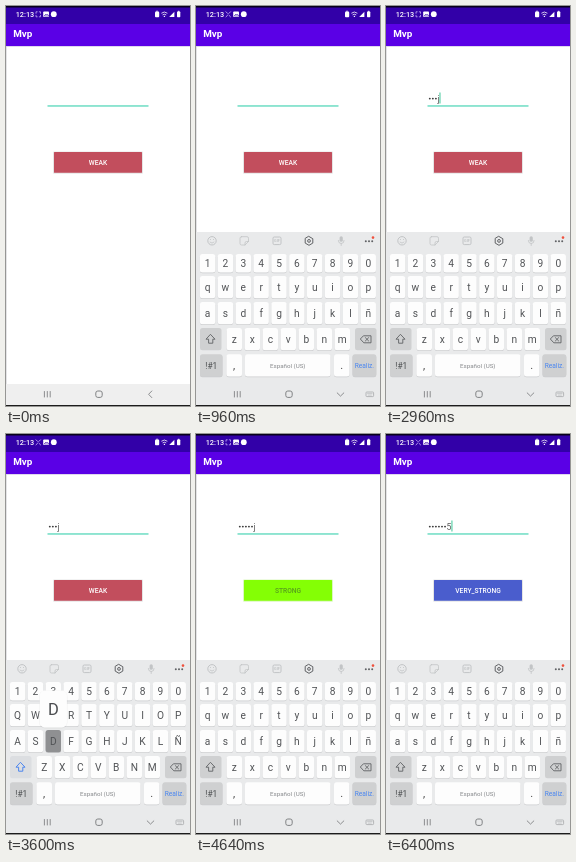
An HTML page that plays this animation: 184x400 px, repeating every 6560 ms.

```html
<!DOCTYPE html>
<html lang="es">
<head>
<meta charset="utf-8">
<style>
html, body { margin: 0; width: 100%; height: 100%; overflow: hidden; background: #fff; }
svg { display: block; width: 184px; height: 400px; font-family: Roboto, sans-serif; }
text { text-anchor: middle; }
.line { fill: none; stroke-linecap: round; stroke-linejoin: round; }
</style>
</head>
<body>
<svg id="stage" viewBox="0 0 184 400"></svg>
<script>
const LOOP = 6560, STEP = 80;
const NS = 'http://www.w3.org/2000/svg';
const stage = document.getElementById('stage');

function add(parent, tag, attrs, label) {
  const el = document.createElementNS(NS, tag);
  for (const k in attrs) el.setAttribute(k, attrs[k]);
  if (label !== undefined) el.textContent = label;
  parent.appendChild(el);
  return el;
}
const group = (p, a = {}) => add(p, 'g', a);
const rect = (p, x, y, width, height, fill, rx = 0) => add(p, 'rect', { x, y, width, height, fill, rx });
const dot = (p, cx, cy, r, fill) => add(p, 'circle', { cx, cy, r, fill });
const line = (p, d, stroke, w = 0.8) => add(p, 'path', { d, stroke, 'stroke-width': w, class: 'line' });
const text = (p, x, y, size, fill, s, extra) => add(p, 'text', { x, y, 'font-size': size, fill, ...extra }, s);
const show = (el, on) => el.setAttribute('display', on ? 'inline' : 'none');

// Page
rect(stage, 0, 0, 184, 400, '#fff');
rect(stage, 0, 40, 0.7, 338, '#d9d9dc');
rect(stage, 0, 0, 184, 18, '#3200a8');
rect(stage, 0, 0, 184, 1.5, '#08001c');
rect(stage, 0, 18, 184, 22, '#5a00e6');
rect(stage, 0, 40, 184, 0.8, '#d8cdea');
text(stage, 7.2, 31.1, 9.9, '#fff', 'Mvp', { 'font-weight': 700, style: 'text-anchor:start' });

// Status bar
text(stage, 9.7, 10.9, 7.3, '#fff', '12:13', { 'font-weight': 500, style: 'text-anchor:start' });
const corners = line(stage, 'M30 7.300v-1.500h1.200M33.300 5.800h1.200v1.500M34.500 9.300v1.500h-1.200M31.200 10.800h-1.200v-1.500', '#d6c8ff', 0.7);
const cross = line(stage, 'M30 5.800l1.600 1.600M34.500 5.800l-1.600 1.600M30 10.800l1.600-1.600M34.500 10.800l-1.600-1.600', '#d6c8ff', 0.8);
rect(stage, 37.2, 5.4, 5.8, 5.6, '#fff', 0.8);
line(stage, 'M38.500 9.700l1.400-1.700 1 1 .8-.7 .8 1.400z', '#3200a8', 0.6);
dot(stage, 47.8, 8.2, 2.9, '#fff');
rect(stage, 149, 5.8, 4.2, 5.4, '#fff', 0.9);
line(stage, 'M150.200 5.800v-.6h1.800v.6', '#fff', 0.7);
line(stage, 'M155.700 7q2.700-2.200 5.400 0M156.900 8.700q1.500-1.200 3 0', '#fff', 0.8);
dot(stage, 158.4, 10.4, 0.7, '#fff');
add(stage, 'path', { d: 'M163.200 11.100h5.200v-5.400z', fill: '#fff' });
rect(stage, 171, 5.5, 3.3, 5.8, '#fff', 0.7);
rect(stage, 171.9, 4.8, 1.5, 1, '#fff');

// Password field
rect(stage, 41.5, 99, 101, 1.9, '#8ce4d0');
const caret = rect(stage, 0, 86.5, 1.8, 11, '#93e0c6');
const dots = Array.from({ length: 6 }, (_, i) => dot(stage, 43.8 + 3.05 * i, 92.6, 0.95, '#3c3c3c'));
const lastChar = text(stage, 0, 95.7, 8.6, '#5c5c5c', '', { style: 'text-anchor:start' });

// Strength button
const shade = rect(stage, 47, 145.4, 90, 22.4, '#0000001a', 1);
const button = rect(stage, 48, 146, 88, 20.8, '#c24e5d', 0.6);
const level = text(stage, 92, 158.8, 6.7, '#fff', '', { 'font-weight': 500 });
const LEVELS = [
  [0, 'WEAK', '#c24e5d', '#fff'],
  [3920, 'STRONG', '#84ff05', '#58a01c'],
  [5040, 'VERY_STRONG', '#4a5dcd', '#fff']
];

// Keyboard
const PANEL = '#e9eaeb';
const board = group(stage);
rect(board, 0, 226, 184, 175, PANEL);
const pale = '#c2c4c6', dark = '#606265';
dot(board, 16, 234.8, 4.2, 'none').setAttribute('stroke', pale);
line(board, 'M14 236.200q2 2 4 0M14.500 233.400v.2M17.500 233.400v.2', pale);
line(board, 'M45.500 230.700h5.500q1.500 0 1.500 1.500v3.300l-3.500 3.500h-3.500q-1.500 0-1.500-1.500v-5.300q0-1.500 1.500-1.500zM49 239v-2q0-1.500 1.500-1.500h2', pale);
rect(board, 77, 231, 8, 7.6, 'none', 1.3).setAttribute('stroke', pale);
text(board, 81, 236.3, 3.8, pale, 'GIF', { 'font-weight': 700 });
line(board, 'M113 230.500l3.800 2.200v4.400l-3.800 2.200l-3.800-2.200v-4.400z', dark, 1);
dot(board, 113, 234.9, 1.4, 'none').setAttribute('stroke', dark);
rect(board, 143.6, 230.2, 3.2, 5.6, pale, 1.6);
line(board, 'M142.300 234.500q0 3 2.900 3t2.900-3M145.200 237.500v2', pale);
[169.8, 173, 176.2].forEach(x => dot(board, x, 235.3, 1, dark));
dot(board, 177, 231.6, 1.3, '#f0503c');

const KEY = '#fdfdfd', GREY = '#cfd0d1', DOWN = '#8f9092', EDGE = '#cbccce';
const keys = {};
function makeKey(cx, top, w, h, name, size) {
  rect(board, cx - w / 2, top + 0.7, w, h, EDGE, 2.5);
  const box = rect(board, cx - w / 2, top, w, h, KEY, 2.5);
  const label = text(board, cx, top + h / 2 + size * 0.35, size, '#515356', name);
  keys[name] = { cx, top, box, label };
}
function row(names, x, pitch, top, h) {
  [...names].forEach((c, i) => makeKey(x + pitch * i, top, 15.4, h, c, 10.2));
}
row('1234567890', 11.6, 17.85, 248, 18.5);
row('qwertyuiop', 11.6, 17.85, 270, 22.3);
row('asdfghjklñ', 11.6, 17.85, 296, 22.3);
row('zxcvbnm', 38.3, 18, 322, 22.3);

function wideKey(x, w, name, size, fill, ink) {
  rect(board, x, 349, w, 22.3, EDGE, 2.5);
  rect(board, x, 348.3, w, 22.3, fill, 2.5);
  text(board, x + w / 2, 359.6 + size * 0.35, size, ink, name);
}
wideKey(4, 22.5, '!#1', 8.4, GREY, '#4c4e50');
wideKey(30.4, 15.6, ',', 11, KEY, '#444');
wideKey(49, 85.5, 'Español (US)', 6.2, KEY, '#85878a');
wideKey(138, 15.4, '.', 11, KEY, '#444');
wideKey(156.5, 23.8, 'Realiz.', 6.6, GREY, '#4a86f0');

const shiftBox = rect(board, 4, 322, 21.5, 22.3, GREY, 2.5);
const shiftIcon = line(board, 'M14.700 328.600l4.300 4.600h-2.200v4h-4.200v-4h-2.200z', dark, 0.9);
rect(board, 159, 322, 21.5, 22.3, GREY, 2.5);
line(board, 'M167.800 329.800h7.200v7h-7.200l-3.200-3.500zM169.400 331.700l3.200 3.200M172.600 331.700l-3.200 3.200', dark, 0.9);

// Key preview
const popup = group(stage);
rect(popup, -14.2, -37, 28.4, 38, '#0000000c', 6);
rect(popup, -13.6, -37, 27.2, 37, '#fdfdfd', 5);
const popupText = text(popup, 0, -12.5, 16.5, '#4c4e51', '');

// Navigation bar
const navBack = rect(stage, 0, 378, 184, 22, '#efefef');
rect(stage, 0, 399, 184, 1, '#1c1c1c');
const ink = '#808284';
line(stage, 'M38.400 385.500v5.500M41.300 385.500v5.500M44.200 385.500v5.500', ink, 0.9);
rect(stage, 89.8, 385, 6.4, 6.4, 'none', 2).setAttribute('stroke', ink);
const back = line(stage, 'M145.800 385l-3.200 3.300l3.200 3.300', ink, 0.9);
const hide = group(stage);
line(hide, 'M141.200 386.900l3.300 3.200l3.300-3.200', ink, 0.9);
rect(hide, 170, 386, 7.6, 4.6, 'none', 0.8).setAttribute('stroke', '#b4b6b8');
line(hide, 'M171.500 387.600h4.600M172.300 389.100h3', '#b4b6b8', 0.6);

// Presses: character, down, typed, up
const PRESSES = [
  ['d', 1360, 1440, 1600], ['j', 1760, 1840, 2000], ['d', 2240, 2320, 2400],
  ['j', 2560, 2720, 2800], ['D', 3520, 3760, 3760], ['j', 3840, 3920, 4240],
  ['5', 4960, 5040, 5440]
];
const FOCUS = 240, CAPS_ON = 3120, CAPS_OFF = 3760;

function hold(ms) {
  const n = Math.floor(ms / STEP);
  return (n % 5 === 1 ? n - 1 : n) * STEP;
}

function draw(ms) {
  const t = hold(ms);

  const flip = [1, 2].includes(Math.floor(t / 400) % 7);
  show(corners, !flip);
  show(cross, flip);

  const typed = PRESSES.filter(p => t >= p[2]);
  const n = typed.length;
  const last = typed[n - 1];
  dots.forEach((d, i) => show(d, i < n - 1));
  const x = 42.3 + 3.05 * Math.max(0, n - 1);
  lastChar.textContent = last ? last[0] : '';
  lastChar.setAttribute('x', x);
  const width = !last ? 0 : last[0] === 'j' ? 1.6 : 4.4;
  caret.setAttribute('x', x + width);
  const since = t - (last ? last[2] : FOCUS);
  show(caret, since >= 0 && since % 1000 < 500);

  const [, name, fill, color] = LEVELS.filter(l => t >= l[0]).pop();
  level.textContent = name;
  level.setAttribute('fill', color);
  button.setAttribute('fill', fill);
  shade.setAttribute('fill', name === 'STRONG' ? '#dcf7c0' : '#0000001a');

  const open = t >= 560;
  const p = Math.min(1, Math.max(0, (t - 480) / 320));
  board.setAttribute('transform', `translate(0 ${174 * (1 - p) ** 2})`);
  show(board, open);
  show(hide, open);
  show(back, !open);
  navBack.setAttribute('fill', open ? PANEL : '#efefef');

  const caps = t >= CAPS_ON && t < CAPS_OFF;
  const press = PRESSES.find(k => t >= k[1] && t < k[3]);
  const active = press && press[0].toLowerCase();
  for (const c in keys) {
    keys[c].label.textContent = caps ? c.toUpperCase() : c;
    const lit = c === active && !(press[0] === 'j' && t > press[2]);
    keys[c].box.setAttribute('fill', lit ? DOWN : KEY);
  }
  shiftBox.setAttribute('fill', t === CAPS_ON - STEP ? DOWN : caps ? '#dcdee1' : GREY);
  shiftIcon.setAttribute('stroke', caps ? '#3f7df0' : dark);

  show(popup, !!press);
  if (press) {
    const k = keys[active];
    popup.setAttribute('transform', `translate(${k.cx} ${k.top - 2.5})`);
    popupText.textContent = press[0];
  }
}

function tick(now) {
  draw(now % LOOP);
  requestAnimationFrame(tick);
}
draw(0);
requestAnimationFrame(tick);
</script>
</body>
</html>
```
